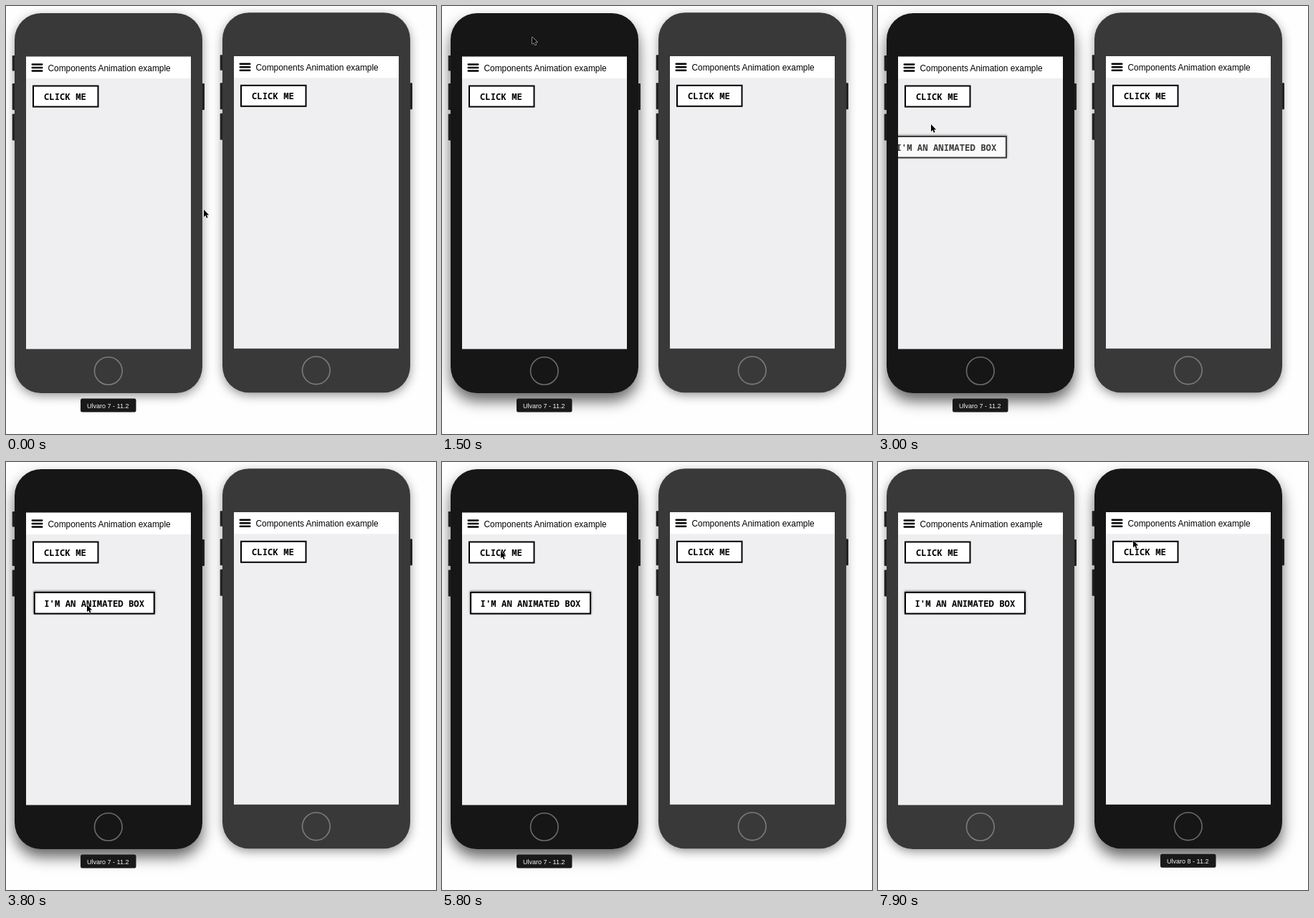
An HTML page for the animation above (8000 ms loop, 600x597 px).

```html
<!DOCTYPE html>
<html lang="en">
<head>
<meta charset="utf-8">
<title>Components Animation example</title>
<style>
  html, body { margin: 0; width: 100%; height: 100%; overflow: hidden; background: #fefefe; }
  svg { display: block; width: 600px; height: 597px; }
  .body { fill: #39393a; filter: drop-shadow(0 4px 7px rgba(0, 0, 0, .4)); }
  .active .body { fill: #161617; filter: drop-shadow(0 11px 10px rgba(0, 0, 0, .6)); }
  .keys { fill: #29292a; }
  .home { fill: none; stroke: #7b7b7c; stroke-width: 1.6; }
  .active .home { stroke: #6a6a6b; }
  .screen { fill: #efeef0; }
  .header { fill: #fff; }
  .menu { stroke: #000; stroke-width: 2.4; stroke-linecap: round; }
  .frame { fill: #fff; stroke: #000; stroke-width: 2; }
  .title { font: 11.9px "Liberation Sans", Arial, sans-serif; }
  .mono { font: 700 12.27px "Noto Sans Mono", "DejaVu Sans Mono", monospace; }
  .tag rect { fill: #19191a; }
  .tag text { font: 9px "Liberation Sans", Arial, sans-serif; fill: #f4f4f4; text-anchor: middle; }
  #box .frame { filter: drop-shadow(0 -1px 1.4px rgba(0, 0, 0, .55)); }
  #ring { fill: none; }
  #cursor path { fill: #000; stroke: #fff; stroke-width: 1; stroke-linejoin: round; paint-order: stroke; }
</style>
</head>
<body>
<svg viewBox="0 0 600 597" xmlns="http://www.w3.org/2000/svg">
  <defs><clipPath id="view"><rect x="28" y="101" width="230" height="377.5"/></clipPath></defs>
  <g id="phones"></g>
  <g clip-path="url(#view)">
    <g id="box">
      <rect class="frame" x="38" y="182" width="167" height="29.5"/>
      <text class="mono" x="51.5" y="202">I'M AN ANIMATED BOX</text>
    </g>
  </g>
  <g id="ring">
    <circle r="14.8" stroke="#bbb" stroke-width=".9"/>
    <circle r="13" stroke="#8a8a8a" stroke-width=".7"/>
  </g>
  <g id="cursor"><path d="M0 0V10.2L2.3 8.1L3.9 11.8L5.6 11L4 7.4H7.2Z"/></g>
</svg>
<script>
const LOOP = 8000, STEP = 100;
const $ = id => document.getElementById(id);

const phone = (id, x, y, name) => `
  <g id="${id}" transform="translate(${x} ${y})">
    <g class="keys">
      <rect x="8.7" y="69" width="6" height="21.5" rx="1"/>
      <rect x="8.7" y="108" width="6" height="37" rx="1"/>
      <rect x="8.7" y="150.5" width="6" height="37" rx="1"/>
      <rect x="271" y="108" width="6" height="37" rx="1"/>
    </g>
    <rect class="body" x="12" y="10" width="262" height="530" rx="37"/>
    <rect class="screen" x="28" y="70.7" width="230" height="407.8"/>
    <rect class="header" x="28" y="70.7" width="230" height="30.3"/>
    <path class="menu" d="M36.7 81.5H50.3M36.7 86H50.3M36.7 90.5H50.3"/>
    <text class="title" x="58.5" y="90.5">Components Animation example</text>
    <rect class="frame" x="38" y="111.5" width="90.5" height="29"/>
    <text class="mono" x="53" y="131">CLICK ME</text>
    <circle class="home" cx="142.8" cy="509" r="19.3"/>
    <g class="tag">
      <rect x="104" y="547.5" width="77.5" height="19" rx="2.5"/>
      <text x="142.3" y="560.6">${name} - 11.2</text>
    </g>
  </g>`;
$("phones").innerHTML = phone("left", 0, 0, "Ulvaro 7") + phone("right", 290, -0.7, "Ulvaro 8");

// time, x, y of the pointer tip
const path = [
  [0, 276, 284], [750, 126, 43], [1500, 126, 43], [2200, 84, 128], [2400, 84, 128],
  [3000, 74, 165], [3200, 88, 203], [3500, 112, 204], [3800, 113, 199], [4100, 82, 120],
  [4300, 82, 124], [6200, 82, 124], [7050, 396, 39], [7150, 396, 39], [7900, 356, 109]
];
const clicks = [[800, 1500], [2200, 2400], [4500, 4700], [7100, 7300]];
const entries = [2580, 4620];
const slide = 105;

const within = (t, [from, to]) => t >= from && t < to;
const show = (el, on) => el.setAttribute("visibility", on ? "visible" : "hidden");
const move = (el, x, y) => el.setAttribute("transform", `translate(${x} ${y})`);

function pointer(t) {
  const i = path.findIndex(p => p[0] > t);
  if (i < 0) return path[path.length - 1].slice(1);
  const [t0, x0, y0] = path[i - 1], [t1, x1, y1] = path[i];
  const u = (t - t0) / (t1 - t0), e = u * u * (3 - 2 * u);
  return [x0 + (x1 - x0) * e, y0 + (y1 - y0) * e];
}

// remaining share of an underdamped spring, s in seconds
function spring(s) {
  const w = 3.49, d = 3.62;
  return s > 1.5 ? 0 : Math.exp(-d * s) * (Math.cos(w * s) + d / w * Math.sin(w * s));
}

function draw(t) {
  const second = t >= 7200;
  $("left").classList.toggle("active", t >= 800 && !second);
  $("right").classList.toggle("active", second);
  show($("left").querySelector(".tag"), !second);
  show($("right").querySelector(".tag"), t >= 6800);

  const start = entries.filter(s => s <= t).pop();
  show($("box"), start !== undefined);
  if (start !== undefined) {
    const rest = spring((t - start) / 1000);
    move($("box"), -slide * rest, 0);
    $("box").setAttribute("opacity", Math.min(1, 1 - rest));
  }

  const [x, y] = pointer(t);
  move($("cursor"), x, y);
  move($("ring"), x, y);
  show($("ring"), clicks.some(c => within(t, c)));
}

const origin = performance.now();
function tick() {
  const t = (performance.now() - origin) % LOOP;
  draw(Math.floor(t / STEP) * STEP);
  requestAnimationFrame(tick);
}
tick();
</script>
</body>
</html>
```
